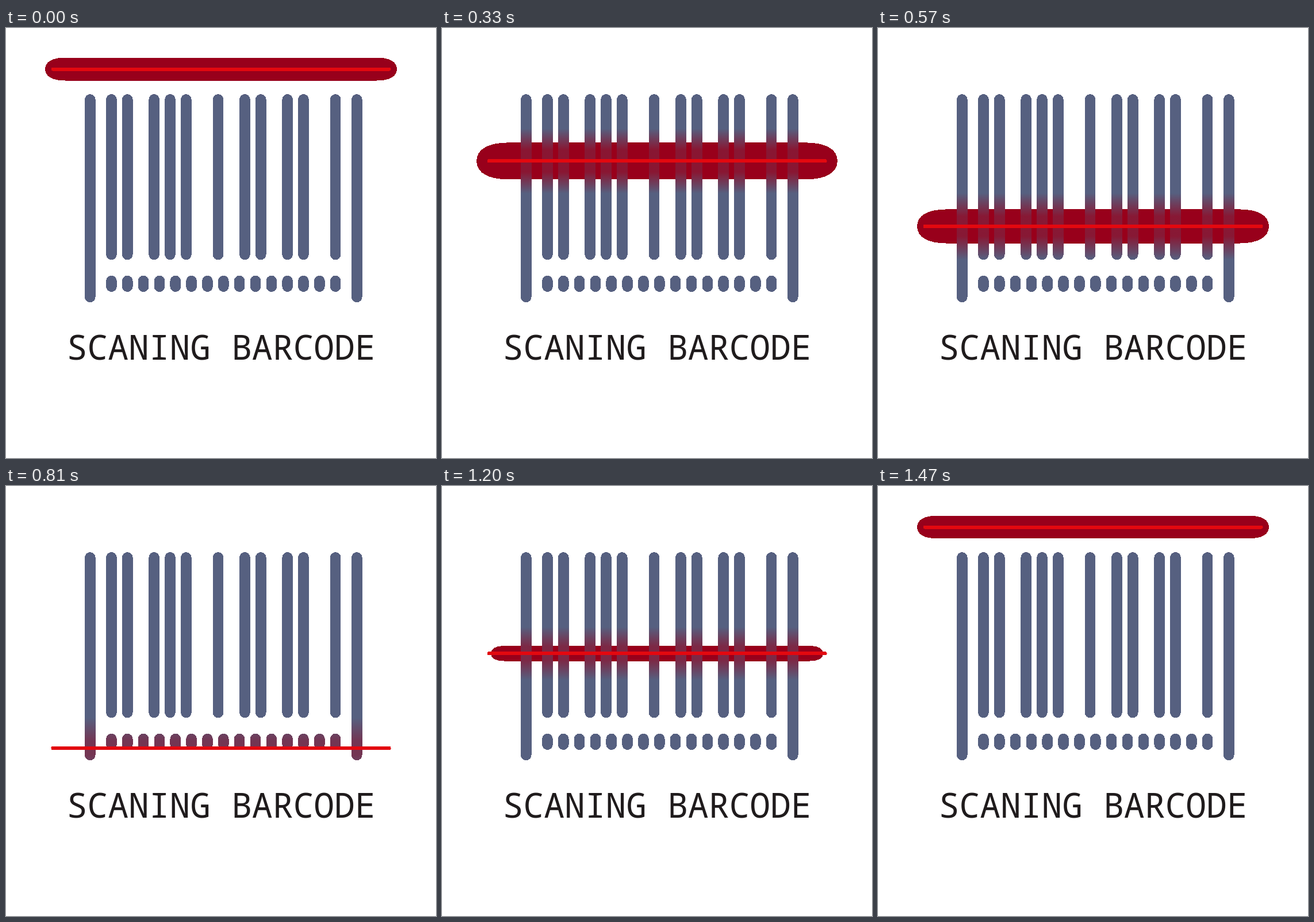
Animation of 748x748 px, one loop 1.5 s. Source, as an HTML page:

```html
<!DOCTYPE html>
<html lang="en">
<head>
<meta charset="utf-8">
<title>Scan line</title>
<style>
  html, body { margin: 0; width: 100%; height: 100%; overflow: hidden; background: #fff; }
  svg { display: block; width: 100vw; height: 100vh; shape-rendering: crispEdges; }
  text { font: 300 59.7px "Noto Sans Mono", "DejaVu Sans Mono", monospace; }
</style>
</head>
<body>
<svg viewBox="0 0 748 748">
  <defs>
    <linearGradient id="tint" gradientUnits="userSpaceOnUse" x1="0" x2="0" y1="0" y2="1"></linearGradient>
    <g id="bars" fill="none" stroke-width="18.6" stroke-linecap="round"></g>
    <text id="label" x="105.5" y="577">SCANING BARCODE</text>
  </defs>
  <path id="glow" fill="#98001b"/>
  <use href="#bars" stroke="#566080"/>
  <use href="#label" fill="#1f1b1c"/>
  <use href="#bars" stroke="url(#tint)"/>
  <use href="#label" fill="url(#tint)"/>
  <rect id="beam" x="78.5" width="591" height="6" rx="2.5" fill="#e3080f"/>
</svg>
<script>
const LOOP = 1500, STEP = 30, TURN = 930, END = 1470;
const TOP = 71.5, DROP = 439.5, CX = 374;
const NS = "http://www.w3.org/2000/svg";
const byId = id => document.getElementById(id);

function set(el, attrs) {
  for (const k in attrs) el.setAttribute(k, attrs[k]);
  return el;
}
function add(parent, tag, attrs = {}) {
  return parent.appendChild(set(document.createElementNS(NS, tag), attrs));
}

// Bars sit on a grid of one bar width.
const UNIT = 18.56, LEFT = 146.3;
function bar(col, y1, y2) {
  const x = LEFT + col * UNIT;
  add(byId("bars"), "path", { d: `M${x} ${y1}V${y2}` });
}
for (const col of [2, 3.5, 6, 7.5, 9, 12, 14.5, 16, 18.5, 20, 23]) bar(col, 124.4, 394);
for (const col of [0, 25]) bar(col, 124.4, 468);
for (let i = 0; i < 15; i++) bar(2 + i * 1.5, 440, 449.7);

const stops = Array.from({ length: 4 }, () => add(byId("tint"), "stop", { "stop-color": "#98001b" }));

function beamY(t) {
  const u = t / TURN;
  return t < TURN
    ? TOP + DROP * (u + 0.01 * Math.sin(Math.PI * u))
    : TOP + DROP * (END - t) / (END - TURN);
}

// The glow swells, collapses before the turn, then builds again on the way up.
function glowSize(t) {
  const down = t < TURN;
  const sq = down ? Math.min(400 + 1.9 * t, 3.95 * (792 - t)) : 0.8 * (t - 980);
  const w = down
    ? 306 + Math.min(0.024 * t, 0.1 * (570 - t))
    : 306 - 0.063 * (END - t);
  return { w, h: Math.sqrt(Math.max(0, sq)) };
}

// Flat bar with long, slightly square round ends.
function pill(y, w, h) {
  const cap = 1.75 * h, k = 0.36;
  const end = s => {
    const tip = CX + s * w, base = tip - s * cap;
    const cx = base + s * cap * (1 - k), cy = h * (1 - k);
    return `L${base} ${y - s * h}C${cx} ${y - s * h} ${tip} ${y - s * cy} ${tip} ${y}` +
      `S${cx} ${y + s * h} ${base} ${y + s * h}`;
  };
  return `M${CX} ${y - h}${end(1)}${end(-1)}Z`;
}

function draw(t) {
  const y = beamY(t), { w, h } = glowSize(t);
  set(byId("beam"), { y: y - 3 });
  set(byId("glow"), { d: h ? pill(y, w, h) : "" });

  const strength = 0.45 + 0.01 * h;
  const core = Math.max(0.6 * h, 12);
  const reach = 46 + 12 * Math.max(0, Math.sin(Math.PI * t / 1000));
  [-reach, -core, core, reach].forEach((d, i) => set(stops[i], {
    offset: (d + reach) / (2 * reach),
    "stop-opacity": Math.abs(d) < reach ? strength : 0
  }));
  set(byId("tint"), { y1: y - reach, y2: y + reach });
}

const start = performance.now();
function tick() {
  const t = (performance.now() - start) % LOOP;
  draw(Math.floor(t / STEP) * STEP);
  requestAnimationFrame(tick);
}
draw(0);
requestAnimationFrame(tick);
</script>
</body>
</html>
```
